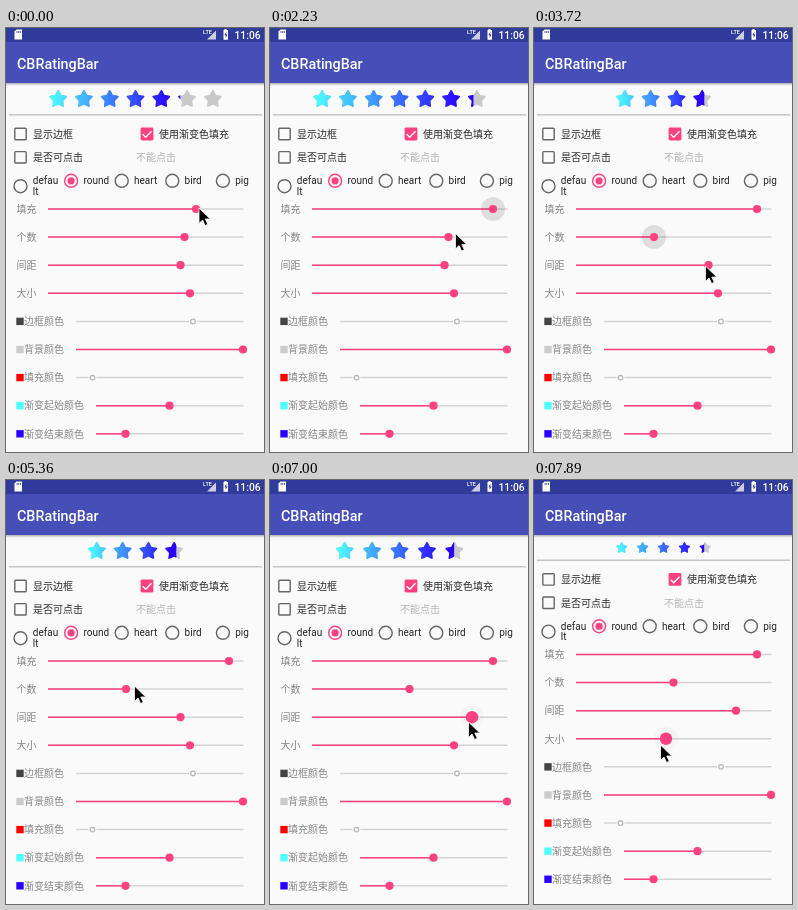
Recreate the animation shown at these times as an HTML page. Size 258 by 424 pixels, loop 8000 ms.

```html
<!DOCTYPE html>
<html lang="zh-CN">
<head>
<meta charset="utf-8">
<title>CBRatingBar</title>
<style>
  html, body { margin: 0; width: 100%; height: 100%; overflow: hidden; background: #fafafa; }
  svg { display: block; width: 100%; height: 100%; }
  text { font: 10px Roboto, "Noto Sans CJK SC", "Noto Sans CJK", sans-serif; fill: #262626; }
  .label { fill: #858585; }
  .hint { fill: #b2b2b2; }
  .bar { fill: #fff; font-weight: 500; }
  .ring { fill: none; stroke: #666; stroke-width: 1.4; }
  .track { stroke: #d4d4d4; stroke-width: 1.5; }
  .pink { fill: #ff4081; }
  .level { stroke: #ff4081; stroke-width: 1.5; }
</style>
</head>
<body>
<svg id="stage" viewBox="0 0 258 424">
  <defs>
    <linearGradient id="blend" gradientUnits="userSpaceOnUse" y1="0" y2="0">
      <stop stop-color="#4dffff"/><stop offset=".93" stop-color="#2a00ff"/>
    </linearGradient>
    <linearGradient id="shade" x2="0" y2="1">
      <stop stop-color="#000" stop-opacity=".28"/><stop offset="1" stop-color="#000" stop-opacity="0"/>
    </linearGradient>
    <clipPath id="clip"><rect id="cover" y="56" height="30"/></clipPath>
  </defs>
  <rect width="258" height="424" fill="#fafafa"/>
  <rect y="55" width="258" height="3" fill="url(#shade)"/>
  <rect width="258" height="55" fill="#464fb8"/>
  <rect width="258" height="14" fill="#303c9c"/>
  <path d="M10.5 1.5h5.5v10h-7.5v-8z" fill="#fff"/>
  <path d="M11 3v2M12.7 3v2M14.4 3v2" stroke="#303c9c" stroke-width=".8"/>
  <text class="bar" x="197" y="6" style="font-size:5.5px">LTE</text>
  <path d="M201 11.5h9v-9z" fill="#fff" fill-opacity=".75"/>
  <path d="M217.5 2h1V1h2v1h1.5v9.8h-4.5z" fill="#fff"/>
  <path d="M220.3 3.6l-1.8 3.7h1.2v2.8l1.7-3.7h-1.1z" fill="#303c9c"/>
  <text class="bar" x="228.5" y="10.5" style="font-size:10.3px">11:06</text>
  <text class="bar" x="11" y="41" style="font-size:14.35px">CBRatingBar</text>

  <g stroke-linejoin="round">
    <path id="blank" fill="#c9c9c9" stroke="#c9c9c9"/>
    <path id="filled" fill="url(#blend)" stroke="url(#blend)" clip-path="url(#clip)"/>
  </g>

  <g id="form">
    <path d="M3 86.8H256" stroke="#c6c6c6" stroke-width="1.6"/>
    <rect class="ring" x="8.8" y="100.3" width="11.4" height="11.4" rx=".8"/>
    <text x="27" y="110">显示边框</text>
    <rect class="pink" x="134.6" y="99.6" width="12.8" height="12.8" rx="1.4"/>
    <path d="M136.7 106.2l3 3 5.8-5.9" fill="none" stroke="#fff" stroke-width="1.4"/>
    <text x="153" y="110">使用渐变色填充</text>
    <rect class="ring" x="8.8" y="123.6" width="11.4" height="11.4" rx=".8"/>
    <text x="27" y="133.2">是否可点击</text>
    <text class="hint" x="130" y="133.2">不能点击</text>
  </g>

  <path id="cursor" d="M0 0V15.4l3.6-3.3 2.5 5.4 2.7-1.2-2.5-5.3H11.3Z" fill="#000" stroke="#fff" stroke-width=".8"/>
</svg>
<script>
const $ = id => document.getElementById(id);
const form = $('form');

function add(tag, attrs, text = '') {
  const node = document.createElementNS('http://www.w3.org/2000/svg', tag);
  set(node, attrs);
  node.textContent = text;
  return form.appendChild(node);
}
function set(node, attrs) {
  for (const name in attrs) node.setAttribute(name, attrs[name]);
}

['defau', 'round', 'heart', 'bird', 'pig'].forEach((name, i) => {
  const cx = 14.5 + 50.6 * i, cy = i ? 152.8 : 158.2;
  const ring = add('circle', { class: 'ring', cx, cy, r: 6.5 });
  if (i === 1) {
    ring.style.stroke = '#ff4081';
    add('circle', { class: 'pink', cx, cy, r: 3.6 });
  }
  add('text', { x: cx + 12.3, y: 156.3 }, name);
});
add('text', { x: 26.8, y: 167 }, 'lt');

// label, track start, thumb position, swatch colour, disabled
const rows = [
  ['填充', 42, 190], ['个数', 42, 178.5], ['间距', 42, 174.5], ['大小', 42, 184],
  ['边框颜色', 70, 187, '#444', true], ['背景颜色', 70, 237, '#ccc'],
  ['填充颜色', 70, 86.5, '#f00', true],
  ['渐变起始颜色', 90, 163.5, '#4dffff'], ['渐变结束颜色', 90, 119.5, '#2a00ff']
];
const sliders = rows.map(([label, left, pos, swatch, off], i) => {
  const y = 181 + 28.1 * i;
  if (swatch) add('rect', { x: 10.3, y: y - 3.7, width: 7.4, height: 7.4, fill: swatch });
  add('text', { class: 'label', x: swatch ? 18 : 10.5, y: y + 3.8 }, label);
  add('path', { class: 'track', d: `M${left} ${y}H237.5` });
  if (off) {
    add('circle', { cx: pos, cy: y, r: 4, fill: '#fafafa' });
    add('circle', { cx: pos, cy: y, r: 2.3, fill: '#fafafa', stroke: '#b8b8b8', 'stroke-width': 1.3 });
    return null;
  }
  const level = add('path', { class: 'level' });
  const halo = add('circle', { cy: y, r: 12, fill: '#000', 'fill-opacity': 0 });
  const thumb = add('circle', { class: 'pink', cy: y });
  return (x, r = 4.1, shade = 0) => {
    set(level, { d: `M${left} ${y}H${x}` });
    set(halo, { cx: x, 'fill-opacity': shade });
    set(thumb, { cx: x, r });
  };
});
sliders.forEach((draw, i) => draw && draw(rows[i][2]));

const FILL = 0, COUNT = 1, GAP = 2, SIZE = 3;
const looks = { held: [6.2, .025], glow: [4.1, .11], fade: [4.1, .04] };

// time, cursor x, cursor y, slider, thumb position, look
const steps = [
  [0, 193, 180], [140, 187, 180],
  [1340, 190, 180, FILL, 193, 'held'], [1490, 195, 181, FILL, 198, 'held'],
  [1640, 203, 181, FILL, 206, 'held'], [1790, 212, 181, FILL, 215, 'held'],
  [1940, 219, 182, FILL, 222, 'held'], [2080, 214, 186, FILL, 223, 'held'],
  [2230, 185.5, 205.5, FILL, 223, 'glow'], [2380, 175, 207, FILL, 223, 'fade'],
  [2530, 172, 208], [2680, 164, 208], [2830, 154, 208, COUNT, 159],
  [2970, 143.5, 207.5, COUNT, 159], [3120, 132, 208, COUNT, 139.5],
  [3270, 122, 209, COUNT, 139.5], [3420, 115, 210, COUNT, 120, 'held'],
  [3570, 117, 211, COUNT, 120, 'held'],
  [3720, 171.5, 238, COUNT, 120, 'glow'], [3870, 172, 240, COUNT, 120, 'fade'], [4020, 171, 237],
  [4610, 163, 231], [4760, 140, 216], [4910, 121, 207], [5060, 117, 206],
  [5360, 128.5, 206], [5510, 133, 206, COUNT, 139.5], [5660, 137, 206, COUNT, 139.5, 'held'],
  [5810, 139, 207, COUNT, 139.5, 'held'], [5960, 146, 214, COUNT, 139.5, 'glow'],
  [6100, 158, 225, COUNT, 139.5, 'fade'], [6250, 169, 233], [6400, 174, 235],
  [6700, 181, 238, GAP, 184, 'held'], [6850, 191, 241, GAP, 194, 'held'],
  [7000, 198.5, 242, GAP, 202, 'held'], [7150, 190, 254, GAP, 202, 'glow'],
  [7300, 179, 264, GAP, 202, 'fade'], [7450, 170, 265, SIZE, 175, 'held'],
  [7600, 153, 265, SIZE, 159, 'held'], [7740, 138, 265, SIZE, 144, 'held'],
  [7890, 126.5, 265, SIZE, 132, 'held']
];

function starPath(cx, cy, size) {
  const points = Array.from({ length: 10 }, (_, k) => {
    const a = k * Math.PI / 5, r = size * (k % 2 ? .25 : .47);
    return `${cx + r * Math.sin(a)} ${cy - r * Math.cos(a)}`;
  });
  return `M${points.join('L')}Z`;
}

function drawStars(positions) {
  const [fill, count, gap, size] = positions.map(x => (x - 42) / 195);
  const n = Math.round(count * 10), side = size * 24.5, pitch = side + gap * 11.7;
  const width = n * side + (n - 1) * gap * 11.7, left = 129.5 - width / 2;
  let d = '';
  for (let i = 0; i < n; i++) d += starPath(left + side / 2 + i * pitch, 62.3 + side / 2, side);
  const shape = { d, 'stroke-width': side * .1 };
  set($('blank'), shape);
  set($('filled'), shape);
  set($('cover'), { x: left - 2, width: width * fill + 2 });
  set($('blend'), { x1: left, x2: left + width * fill });
  set(form, { transform: `translate(0 ${side - 17.85})` });
}

let shown = -1;
function render(time) {
  const now = steps.findLastIndex(step => step[0] <= time);
  if (now === shown) return;
  shown = now;
  const positions = rows.slice(0, 4).map(row => row[2]);
  for (const [, , , key, pos] of steps.slice(0, now + 1)) if (key !== undefined) positions[key] = pos;
  const [, x, y, active, , look] = steps[now];
  positions.forEach((pos, i) => sliders[i](pos, ...(i === active && looks[look] || [])));
  drawStars(positions);
  set($('cursor'), { transform: `translate(${x} ${y})` });
}

const start = performance.now();
function tick() {
  render((performance.now() - start) % 8000);
  requestAnimationFrame(tick);
}
tick();
</script>
</body>
</html>
```
